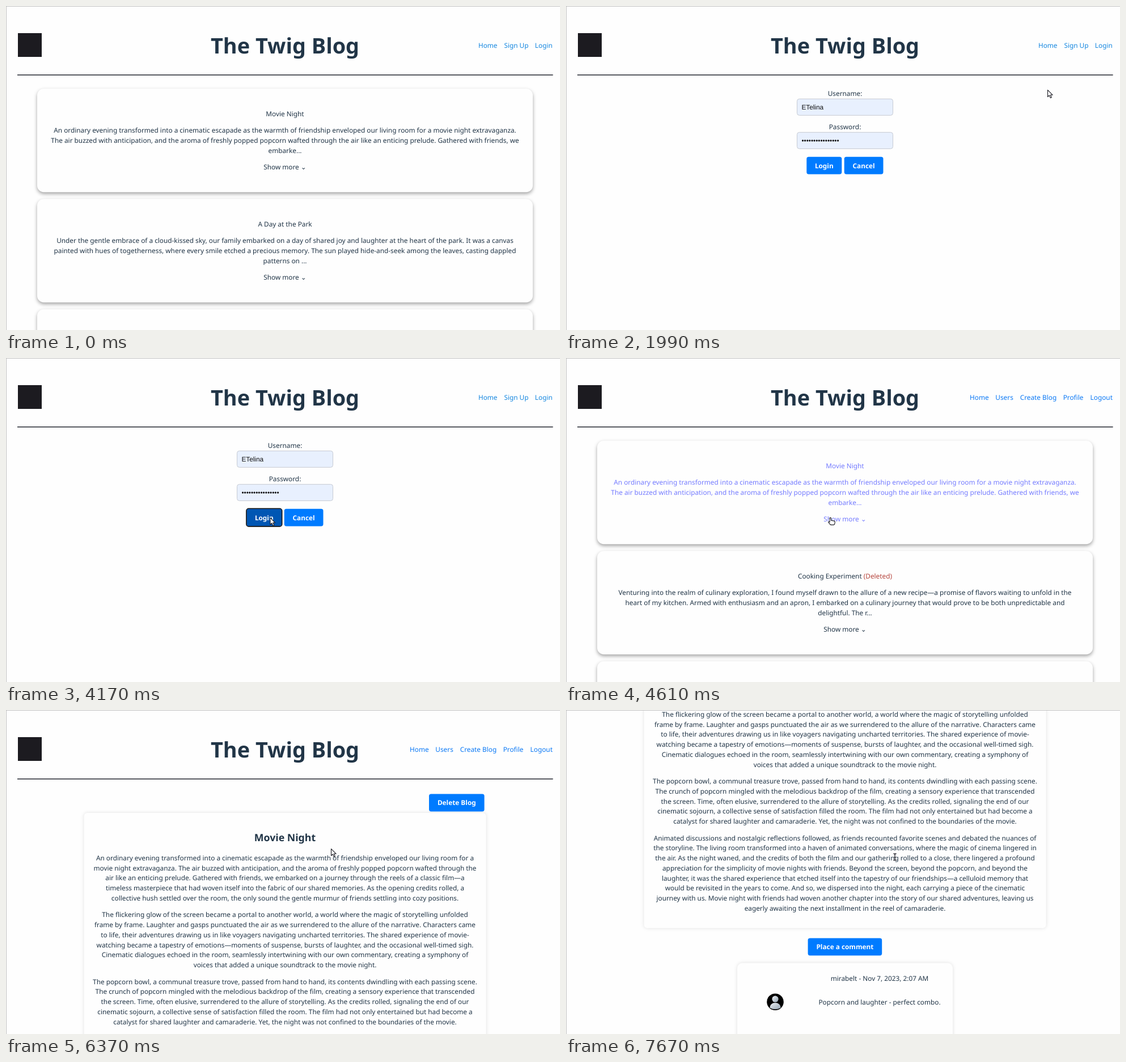
Recreate the animation shown at these times as an HTML page. Size 977 by 573 pixels, loop 8000 ms.

```html
<!DOCTYPE html>
<html lang="en">
<head>
<meta charset="utf-8">
<title>Blog walkthrough</title>
<style>
  html, body { margin: 0; width: 100%; height: 100%; overflow: hidden; background: #fefefe; }
  svg { display: block; width: 977px; height: 573px; }
  text {
    font: 11.825px 'Noto Sans', 'DejaVu Sans', sans-serif;
    fill: #213547; white-space: pre; text-rendering: geometricPrecision;
  }
  .mid { text-anchor: middle; }
  .h1 { font-size: 37.84px; font-weight: 700; }
  .h2 { font-size: 17.74px; font-weight: 700; }
  .btn { font-weight: 700; fill: #fff; }
  .field { font-family: 'Liberation Sans', Arial, sans-serif; fill: #111; }
  .guestNav text { fill: #1587e0; }
  .userNav text { fill: #0a78f5; }
  .hover text { fill: #747bff; }
  .deleted { fill: #b5433b; }
  .card { fill: #fefefe; filter: drop-shadow(0 3.4px 3px rgba(0, 0, 0, .36)); }
  .soft { fill: #fefefe; filter: drop-shadow(0 0 3px rgba(0, 0, 0, .12)); }
</style>
</head>
<body>
<svg id="stage" viewBox="0 0 977 573" xmlns="http://www.w3.org/2000/svg"></svg>
<script>
const LOOP = 8000, CENTER = 492, LINE = 17.737, GAP = 11.825;

const text = (x, y, str, cls = 'mid') => `<text x="${x}" y="${y}" class="${cls}">${str}</text>`;
const rect = (x, y, w, h, r, attrs) =>
  `<rect x="${x}" y="${y}" width="${w}" height="${h}" rx="${r}" ${attrs}/>`;
const group = (id, body, cls = '') => `<g id="${id}" class="${cls}">${body}</g>`;
const lines = (y, rows) => rows.map((row, i) => text(CENTER, y + i * LINE, row)).join('');
const button = (x, y, w, label, id = '') =>
  rect(x, y, w, 30.8, 3.7, `id="${id}" fill="#007bff"`) + text(x + w / 2, y + 19.8, label, 'mid btn');
const nav = items => items.map(([x, label]) => text(x, 73.9, label, '')).join('');

function card(index, title = '', rows = [], cls = '') {
  const top = 146.3 + index * 195;
  const body = title && text(CENTER, top + 48.6, title) +
    lines(top + 48.6 + LINE + GAP, rows) +
    text(CENTER, top + 48.6 + 4 * LINE + 2 * GAP, 'Show more ⌄');
  return `<g class="${cls}">${rect(55, top, 874, 183, 11.8, 'class="card"')}${body}</g>`;
}

function field(y, label, value) {
  return text(CENTER, y - 4.7, label) +
    rect(407.5, y + .3, 169, 29, 4, 'fill="#e8f0fe" stroke="#c6cad2"') +
    text(415.4, y + 18.8, value, 'field');
}

const movieTeaser = ['Movie Night', [
  'An ordinary evening transformed into a cinematic escapade as the warmth of friendship enveloped our living room for a movie night extravaganza.',
  'The air buzzed with anticipation, and the aroma of freshly popped popcorn wafted through the air like an enticing prelude. Gathered with friends, we',
  'embarke...']];
const parkTeaser = ['A Day at the Park', [
  'Under the gentle embrace of a cloud-kissed sky, our family embarked on a day of shared joy and laughter at the heart of the park. It was a canvas',
  'painted with hues of togetherness, where every smile etched a precious memory. The sun played hide-and-seek among the leaves, casting dappled',
  'patterns on ...']];
const cookingTeaser = ['Cooking Experiment <tspan class="deleted">(Deleted)</tspan>', [
  'Venturing into the realm of culinary exploration, I found myself drawn to the allure of a new recipe—a promise of flavors waiting to unfold in the',
  'heart of my kitchen. Armed with enthusiasm and an apron, I embarked on a culinary journey that would prove to be both unpredictable and',
  'delightful. The r...']];

const story = [[
  'An ordinary evening transformed into a cinematic escapade as the warmth of friendship enveloped our living room for a',
  'movie night extravaganza. The air buzzed with anticipation, and the aroma of freshly popped popcorn wafted through the',
  'air like an enticing prelude. Gathered with friends, we embarked on a journey through the reels of a classic film—a',
  'timeless masterpiece that had woven itself into the fabric of our shared memories. As the opening credits rolled, a',
  'collective hush settled over the room, the only sound the gentle murmur of friends settling into cozy positions.'
], [
  'The flickering glow of the screen became a portal to another world, a world where the magic of storytelling unfolded',
  'frame by frame. Laughter and gasps punctuated the air as we surrendered to the allure of the narrative. Characters came',
  'to life, their adventures drawing us in like voyagers navigating uncharted territories. The shared experience of movie-',
  'watching became a tapestry of emotions—moments of suspense, bursts of laughter, and the occasional well-timed sigh.',
  'Cinematic dialogues echoed in the room, seamlessly intertwining with our own commentary, creating a symphony of',
  'voices that added a unique soundtrack to the movie night.'
], [
  'The popcorn bowl, a communal treasure trove, passed from hand to hand, its contents dwindling with each passing scene.',
  'The crunch of popcorn mingled with the melodious backdrop of the film, creating a sensory experience that transcended',
  'the screen. Time, often elusive, surrendered to the allure of storytelling. As the credits rolled, signaling the end of our',
  'cinematic sojourn, a collective sense of satisfaction filled the room. The film had not only entertained but had become a',
  'catalyst for shared laughter and camaraderie. Yet, the night was not confined to the boundaries of the movie.'
], [
  'Animated discussions and nostalgic reflections followed, as friends recounted favorite scenes and debated the nuances of',
  'the storyline. The living room transformed into a haven of animated conversations, where the magic of cinema lingered in',
  'the air. As the night waned, and the credits of both the film and our gathering rolled to a close, there lingered a profound',
  'appreciation for the simplicity of movie nights with friends. Beyond the screen, beyond the popcorn, and beyond the',
  'laughter, it was the shared experience that etched itself into the tapestry of our friendships—a celluloid memory that',
  'would be revisited in the years to come. And so, we dispersed into the night, each carrying a piece of the cinematic',
  'journey with us. Movie night with friends had woven another chapter into the story of our shared adventures, leaving us',
  'eagerly awaiting the next installment in the reel of camaraderie.'
]];

let storyY = 265.9;
const storyText = story.map(rows => {
  const block = lines(storyY, rows);
  storyY += rows.length * LINE + GAP;
  return block;
}).join('');

const avatar = `<g transform="translate(369 870.6)">
  <circle r="14.8" fill="#000"/>
  <g fill="url(#silver)"><circle cy="-5" r="5.6"/><path d="M-9.5 10.5C-9.5 -1.5 9.5 -1.5 9.5 10.5Q0 15.5 -9.5 10.5Z"/></g></g>`;

const header =
  rect(21, 48, 42, 42, 0, 'fill="#1c1b20"') +
  text(CENTER, 84, 'The Twig Blog', 'mid h1') +
  rect(20, 121.2, 944.6, 1.5, 0, 'fill="#22252e"') +
  group('guestNav', nav([[832.9, 'Home'], [878.4, 'Sign Up'], [932.8, 'Login']]), 'guestNav') +
  group('userNav', nav([[712, 'Home'], [757.3, 'Users'], [800.7, 'Create Blog'],
    [876.7, 'Profile'], [924.6, 'Logout']]), 'userNav');

const loginForm =
  field(164, 'Username:', 'ETelina') +
  field(223.1, 'Password:', '•'.repeat(16)) +
  button(424.3, 266.7, 62, 'Login', 'loginButton') +
  rect(423.9, 266.3, 62.8, 31.6, 4, 'id="focusRing" fill="none" stroke="#101010" stroke-width="1.6"') +
  button(490.7, 266.7, 68.8, 'Cancel');

const postBody =
  button(746, 148.6, 97.6, 'Delete Blog') +
  text(CENTER, 231.6, 'Movie Night', 'mid h2') + storyText +
  button(426.6, 757.9, 130.6, 'Place a comment') +
  rect(302, 802, 380, 200, 9, 'class="soft"') +
  text(553, 833.8, 'mirabelt - Nov 7, 2023, 2:07 AM') +
  text(553, 875.1, 'Popcorn and laughter - perfect combo.') + avatar;

const arrow = 'M.5.6V12.6L3.3 10 5.3 14.6 7.3 13.7 5.4 9.3H9.2Z';
const hand = 'M-.9 1.6a1.2 1.2 0 0 1 2.4 0V5.2l5.3.9q1.6.3 1.5 2l-.4 2.7q-.3 2.1-2 2.3H1.4q-1 0-1.7-1L-3.2 8.7q-.4-1.3 1-1.2l1.3.8Z';
const beam = 'M-2.5-6Q0-6 0-4.6Q0-6 2.5-6M0-5V5M-2.5 6Q0 6 0 4.6Q0 6 2.5 6M-1.5.6H1.5';

document.getElementById('stage').innerHTML = `
  <defs><linearGradient id="silver" x1="0" y1="0" x2="1" y2="1">
    <stop stop-color="#f0f3f6"/><stop offset="1" stop-color="#93a3b2"/></linearGradient></defs>
  <rect width="977" height="573" fill="#fefefe"/>` +
  group('page', header +
    group('guest', card(0, ...movieTeaser) + card(1, ...parkTeaser) + card(2)) +
    group('login', loginForm) +
    group('user', card(0, ...movieTeaser, 'hover') + card(1, ...cookingTeaser) + card(2)) +
    group('post', rect(137.6, 182, 709, 558.2, 6, 'class="soft"') + group('postBody', postBody))) +
  '<path d="M0 .5H977M.5 0V573" stroke="#c2c2c2"/>' +
  group('cursor',
    `<path id="arrow" d="${arrow}" fill="#fff" stroke="#1a1a22" stroke-width="1.1" stroke-linejoin="round"/>
     <path id="hand" d="${hand}" fill="#fff" stroke="#1a1a22" stroke-width="1.1" stroke-linejoin="round"/>
     <g id="beam" fill="none"><path d="${beam}" stroke="#fff" stroke-width="2.6"/>
     <path d="${beam}" stroke="#1a1a22" stroke-width="1.3"/></g>`);

const $ = id => document.getElementById(id);
const show = (id, on) => $(id).setAttribute('display', on ? 'inline' : 'none');
const latest = (track, t) => track.filter(step => step[0] <= t).pop();

// Each step: start time in ms, then its state.
const pages = [[0, 'guest'], [1990, 'login'], [4610, 'user'], [5940, 'post']];
const scrolls = [[0, 0], [7250, 336.7], [7670, 354.4]];
const pointer = [
  [0, 'none', 0, 0], [230, 'arrow', 679, 154], [680, 'arrow', 761, 127], [1110, 'hand', 954, 69],
  [1990, 'arrow', 849, 148], [2420, 'arrow', 695, 254], [2870, 'hand', 466, 282],
  [4170, 'arrow', 465.5, 282], [4610, 'hand', 466, 282], [5490, 'hand', 573, 245],
  [5940, 'arrow', 573, 245], [7250, 'beam', 580, 260]
];

function render(t) {
  const page = latest(pages, t)[1];
  for (const [, id] of pages) show(id, id === page);
  const signedIn = page === 'user' || page === 'post';
  show('guestNav', !signedIn);
  show('userNav', signedIn);
  show('postBody', t >= 6370);
  show('focusRing', t >= 3750);
  $('loginButton').setAttribute('fill', t >= 2870 ? '#0056b3' : '#007bff');
  $('page').setAttribute('transform', `translate(0 ${-latest(scrolls, t)[1]})`);

  const [, shape, x, y] = latest(pointer, t);
  for (const id of ['arrow', 'hand', 'beam']) show(id, id === shape);
  $('cursor').setAttribute('transform', `translate(${x} ${y})`);
}

const start = performance.now();
function tick() {
  render((performance.now() - start) % LOOP);
  requestAnimationFrame(tick);
}
tick();
</script>
</body>
</html>
```
